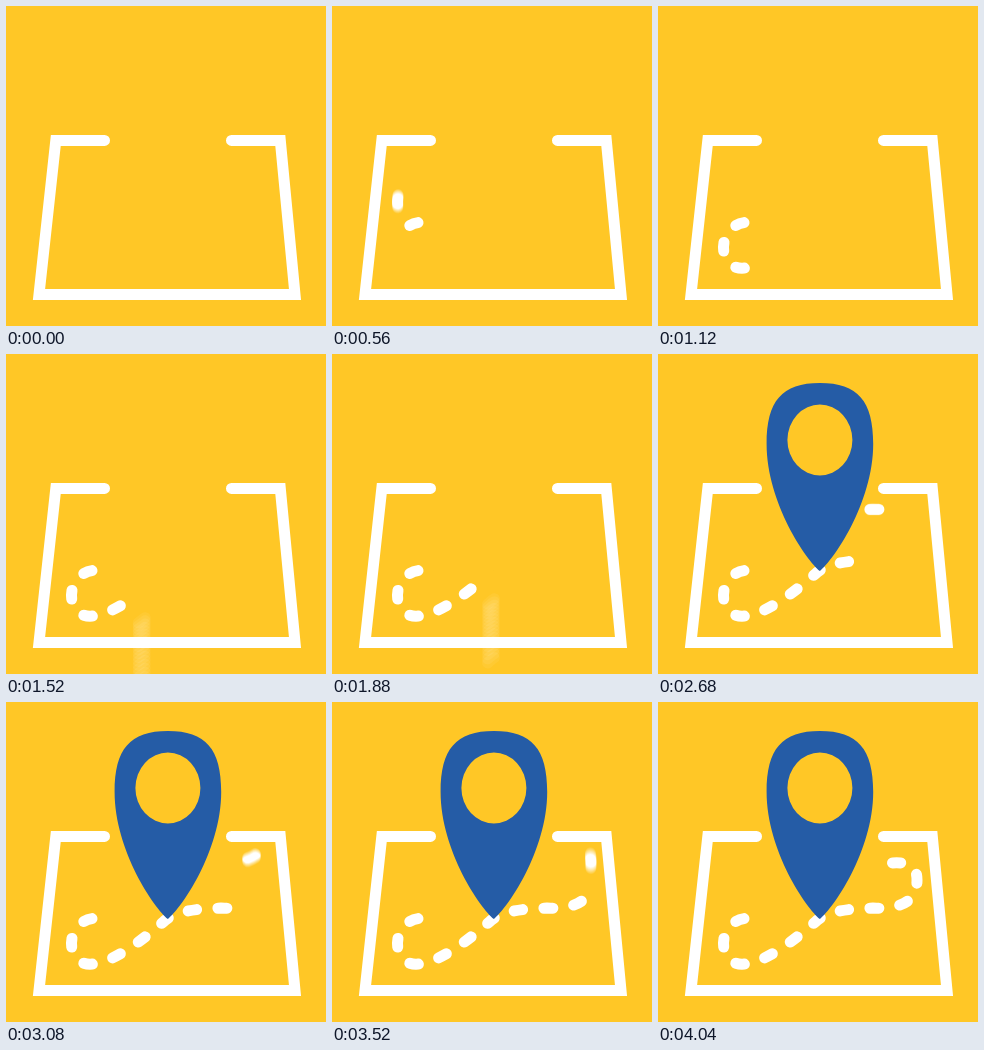
Animation, 320 px wide and 320 px high, one loop 4.08 s. Source, as an HTML page with a canvas:

```html
<!DOCTYPE html>
<html lang="en">
<head>
<meta charset="utf-8">
<title>Map route</title>
<style>
  html, body { margin: 0; width: 100%; height: 100%; overflow: hidden; background: #ffc726; }
  canvas { display: block; width: 100vw; height: 100vh; filter: blur(0.4px); }
  svg { position: absolute; width: 0; height: 0; }
</style>
</head>
<body>
<canvas id="stage" width="320" height="320"></canvas>
<svg><path id="route" d="M86 216.6 C59 221 59 262 84 262.2 C107 262 140 235 158 219.3
  C169 209 192 206.5 215 206.1 C247 207 259 197 259 178 C259 164 251 160 234.5 160.9"/></svg>
<script>
const SIZE = 320, LOOP = 4080, STEP = 40;
const SHUTTER = 20, SAMPLES = 17;
const YELLOW = '#ffc726', BLUE = '#255ca6', WHITE = '#fff';
const DASHES = 11, DASH_LENGTH = 8.7, LINE = 11;

const ctx = document.getElementById('stage').getContext('2d');
const layer = document.createElement('canvas');
layer.width = layer.height = SIZE;
const lc = layer.getContext('2d');

const routeEl = document.getElementById('route');
const route = new Path2D(routeEl.getAttribute('d'));
const spacing = (routeEl.getTotalLength() - DASH_LENGTH) / (DASHES - 1);

const frame = new Path2D('M98.5 134.4 H49.8 L33 288.5 H289 L274.3 134.4 H225.5');

// Pin outline and hole, with the tip at the origin
const pin = new Path2D(`M0 0 C-13 -10 -53.3 -68 -53.3 -127
  C-53.3 -170 -38 -188 0 -188 C38 -188 53.3 -170 53.3 -127 C53.3 -68 13 -10 0 0 Z`);
pin.moveTo(32.5, -131);
pin.ellipse(0, -131, 32.5, 35.5, 0, 0, Math.PI * 2);

const clamp = (v, lo, hi) => Math.min(hi, Math.max(lo, v));
const ease = v => { const x = clamp(v, 0, 1); return x * x * (3 - 2 * x); };

const peakTime = i => clamp(160 + 360 * i, 200, 3740);
const pinScale = t => ease((t - 1875) / 680);

// Vertical shift: shoots up from below, overshoots, then settles
function dashShift(u) {
  return u < 0 ? 107 * Math.pow(-u / 80, 2.2) - 51 : -51 * (1 - ease(u / 200));
}

function strokeLine(c, path) {
  c.lineWidth = LINE;
  c.lineCap = 'round';
  c.strokeStyle = WHITE;
  c.stroke(path);
}

function drawDash(c, i, dy) {
  c.save();
  c.translate(0, dy);
  c.setLineDash([DASH_LENGTH, 1000]);
  c.lineDashOffset = -i * spacing;
  strokeLine(c, route);
  c.restore();
}

function drawPin(c, scale) {
  if (scale <= 0) return;
  c.save();
  c.translate(161.9, 217);
  c.scale(scale, scale);
  c.fillStyle = BLUE;
  c.fill(pin, 'evenodd');
  c.restore();
}

// Averages several moments around t to give motion blur
function blurred(t, value, color, draw) {
  const half = SHUTTER / 2;
  if (value(t - half) === value(t + half)) return draw(ctx, value(t));
  lc.globalCompositeOperation = 'lighter';
  lc.globalAlpha = 1 / SAMPLES;
  lc.clearRect(0, 0, SIZE, SIZE);
  for (let i = 0; i < SAMPLES; i++) {
    draw(lc, value(t - half + SHUTTER * i / (SAMPLES - 1)));
  }
  // Restore the exact colour lost to rounding
  lc.globalCompositeOperation = 'source-in';
  lc.globalAlpha = 1;
  lc.fillStyle = color;
  lc.fillRect(0, 0, SIZE, SIZE);
  ctx.drawImage(layer, 0, 0);
}

function render(t) {
  ctx.fillStyle = YELLOW;
  ctx.fillRect(0, 0, SIZE, SIZE);
  strokeLine(ctx, frame);
  for (let i = 0; i < DASHES; i++) {
    const u = t - peakTime(i);
    if (u >= -120) blurred(u, dashShift, WHITE, (c, dy) => drawDash(c, i, dy));
  }
  blurred(t, pinScale, BLUE, drawPin);
}

const start = performance.now();
function tick() {
  const t = (performance.now() - start) % LOOP;
  render(Math.floor(t / STEP) * STEP);
  requestAnimationFrame(tick);
}
tick();
</script>
</body>
</html>
```
